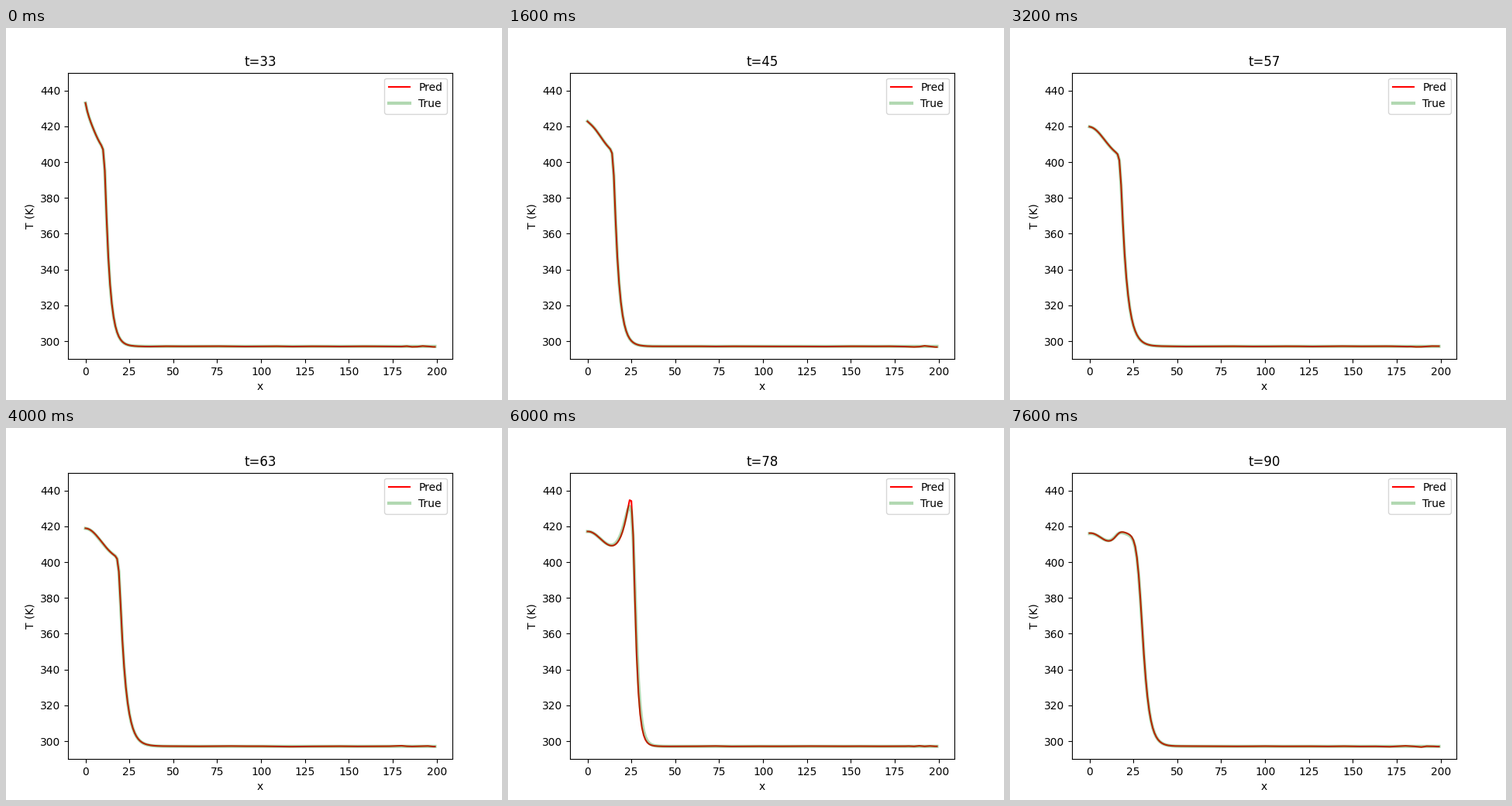
These frames come from a looping animation (640 px wide and 480 px high, 8000 ms). A matplotlib script:

```python
import numpy as np
import matplotlib.pyplot as plt
from matplotlib.animation import FuncAnimation

FRAMES, INTERVAL = 20, 400
FIRST_T, STEP_T = 33, 3
AMBIENT = 297.1
X = np.arange(200)

# Travelling front: position, decay length and sharpness of its upper corner.
KEY_T = [33, 45, 57, 69, 78, 84, 90]
CENTRE = [13, 17, 20.1, 23.1, 28.05, 30.05, 31.3]
LENGTH = [2.7, 2.85, 3.35, 3.4, 1.9, 2.75, 3]
CORNER = [8, 8, 8, 8, 3, 2.5, 2.2]


def soft_min(a, b, power):
    return a * b / (a ** power + b ** power) ** (1 / power)


def dome(t):
    """Hot plateau that sinks away from the heated end."""
    start = 418 - 0.12 * (t - 69)
    width = 13 - 5 * np.exp(-(t - 33) / 13)
    warm_up = 10.7 * np.exp(-(t - 33) / 7) * np.exp(-X / 2)
    return start - 18 * (1 - np.exp(-(X / width) ** 2)) + warm_up


def flare(t, lag):
    """Ignition peak: sharp at first, then lower and broader."""
    growth = 0.6 * max(t - 68.2, 0) * np.exp((X - 15) / 4.8)
    ceiling = 17 + (43 - 14 * lag) * np.exp(-(t - 78) / 3)
    return soft_min(growth, ceiling, 4)


def profile(t, lag=0):
    t = t + lag
    centre, length, corner = (np.interp(t, KEY_T, v)
                              for v in (CENTRE, LENGTH, CORNER))
    hot = dome(t) + flare(t, lag) - AMBIENT
    front = 50 * np.exp((centre - X) / length)
    return AMBIENT + soft_min(hot, front, corner)


def ripple(t):
    """Small model noise, a little stronger at the far end."""
    rng = np.random.default_rng(t)
    anchors = np.concatenate([np.arange(0, 180, 9), np.arange(180, 201, 3)])
    size = np.where(anchors < 180, 0.08, 0.2)
    return np.interp(X, anchors, size * rng.standard_normal(len(anchors)))


fig, ax = plt.subplots(figsize=(6.4, 4.8), dpi=100)
pred, = ax.plot(X, profile(FIRST_T), "r", label="Pred")
true, = ax.plot(X, profile(FIRST_T), "g", lw=3, alpha=0.3, label="True")
ax.set_ylim(290, 450)
ax.set_xlabel("x")
ax.set_ylabel("T (K)")
ax.legend(loc="upper right")
title = ax.set_title("")


def update(frame):
    t = FIRST_T + STEP_T * frame
    lag = np.clip((t - 63) / 12, 0, 1)
    pred.set_ydata(profile(t) + ripple(t))
    true.set_ydata(profile(t, lag))
    title.set_text(f"t={t}")
    return pred, true, title


anim = FuncAnimation(fig, update, frames=FRAMES, interval=INTERVAL,
                     repeat=True, repeat_delay=0)
plt.show()
```
